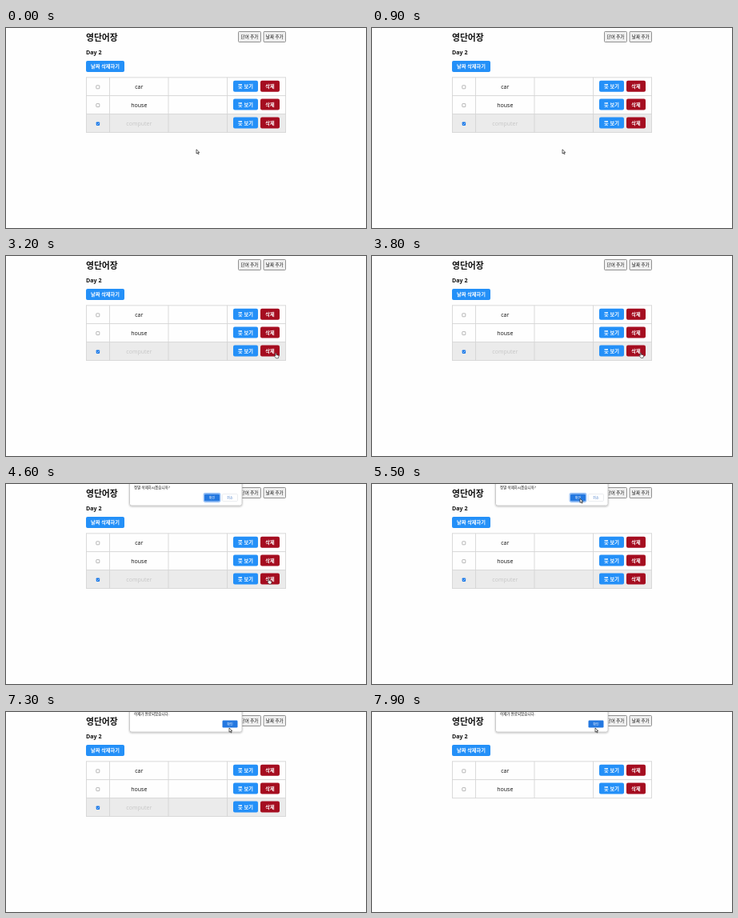
Write an HTML page that moves like this. It is 450 by 250 pixels and loops after 8 s.

```html
<!DOCTYPE html>
<html lang="ko">
<head>
<meta charset="utf-8">
<style>
html, body { margin: 0; width: 100%; height: 100%; overflow: hidden; background: #fefefe; }
svg { display: block; width: 450px; height: 250px; }
text { font-family: "Open Sans", "Noto Sans CJK KR", "Noto Sans CJK", sans-serif; fill: #111; }
.ko { font-family: "Noto Sans CJK KR", "Noto Sans CJK", sans-serif; }
.mid { text-anchor: middle; }
.bold { font-weight: 700; }
.white { fill: #fff; }
</style>
</head>
<body>
<svg id="stage" viewBox="0 0 450 250"></svg>
<script>
const BLUE = '#2490f8', RED = '#a50d20';
const rect = (x, y, w, h, fill, r = 0, extra = '') =>
  `<rect x="${x}" y="${y}" width="${w}" height="${h}" rx="${r}" fill="${fill}" ${extra}/>`;
const text = (x, y, size, str, cls = '', extra = '') =>
  `<text x="${x}" y="${y}" font-size="${size}" class="${cls}" ${extra}>${str}</text>`;
const button = (x, y, w, label, fill) =>
  rect(x, y, w, 14, fill, 2) + text(x + w / 2, y + 9.3, 6.2, label, 'ko mid bold white');
const topButton = (x, w, label) =>
  rect(x + .5, 4.5, w - 1, 13, '#efefef', 1, 'stroke="#777" stroke-width=".8"') +
  text(x + w / 2, 13, 5.5, label, 'ko mid');

function row(y, word, done) {
  const lines = [100.5, 129.5, 203, 276.5, 349.5].map(x => `M${x} ${y}v23`).join('');
  const box = done
    ? rect(112.7, y + 10, 4.4, 4.4, '#1375e8', .8) +
      `<path d="M113.6 ${y + 12.2}l1 1 1.7-2" fill="none" stroke="#fff" stroke-width=".7"/>`
    : rect(112.8, y + 10, 4, 4, '#fff', .6, 'stroke="#888" stroke-width=".6"');
  return rect(100.5, y, 249, 23, done ? '#ebebeb' : '#fefefe') +
    `<path d="${lines}M100 ${y}h250M100 ${y + 23}h250" fill="none" stroke="#d2d2d2" stroke-width=".8"/>` +
    box + text(166.3, y + 14.3, 7, word, 'mid', done ? 'style="fill:#c6c6c6"' : '') +
    button(284, y + 4, 31, '뜻 보기', BLUE) + button(318, y + 4, 24, '삭제', RED);
}

const panel = bottom =>
  rect(154.5, -6, 140.5, bottom + 6, '#fff', 2.5, 'stroke="#bbb" stroke-width=".7" filter="url(#shade)"');
const okButton = (x, y, id) =>
  rect(x - .3, y - .3, 20.6, 10.6, 'none', 1.8, `id="${id}" stroke="#8ab8f5" stroke-width="1.2"`) +
  rect(x + .5, y + .5, 19, 9, '#2478e0', 1.2) +
  text(x + 10, y + 6.5, 4, '확인', 'ko mid white');

stage.innerHTML = `
<defs><filter id="shade" x="-10%" y="-20%" width="120%" height="150%">
  <feDropShadow dx="0" dy=".8" stdDeviation="1" flood-color="#000" flood-opacity=".3"/></filter></defs>` +
  text(100, 15.8, 10.8, '영단어장', 'ko bold') +
  topButton(290, 29, '단어 추가') + topButton(321.5, 28.5, '날짜 추가') +
  text(100, 32.8, 7.1, 'Day 2', 'bold') +
  button(100, 41, 48, '날짜 삭제하기', BLUE) +
  `<g id="last">${row(107.5, 'computer', true)}</g>` +
  row(61.8, 'car') + row(84.6, 'house') +
  `<g id="ask">${panel(27)}${text(160, 5.8, 4.5, '정말 삭제하시겠습니까?', 'ko')}${okButton(247.5, 12, 'askRing')}` +
  rect(270.5, 12.5, 19, 9, '#fff', 1.2, 'stroke="#dde1e6" stroke-width=".6"') +
  text(280, 18.5, 4, '취소', 'ko mid', 'style="fill:#4a7fc8"') + `</g>
<g id="done">${panel(25)}${text(160, 3.6, 4.5, '삭제가 완료되었습니다.', 'ko')}${okButton(270, 10, 'doneRing')}</g>
<g id="cursor" stroke-linejoin="round">
  <path id="arrow" d="M0 0V5.2L1.3 4.1 2.2 6 3.1 5.6 2.2 3.7H3.8Z" fill="#fff" stroke="#222" stroke-width=".7"/>
  <path id="hand" d="M-.6 .4Q0-.4 .6 .4V2.3L3.2 2.9Q3.8 3.2 3.6 4.2L3 6.5H.3L-1.9 3.9Q-1.6 2.9-.6 3.7Z" fill="#fff" stroke="#222" stroke-width=".6"/>
</g>`;

// time, x, y
const path = [
  [0, 238, 151.8], [1500, 238, 151.8], [2400, 337.3, 121.3], [3700, 337.3, 121.3],
  [4100, 328.5, 118.5], [4750, 328.5, 118.5], [5300, 260, 18.2], [6700, 260, 18.2],
  [7200, 279, 20], [8000, 279, 20]
];
const el = id => document.getElementById(id);
const clamp = v => Math.max(0, Math.min(1, v));
const show = (id, on) => el(id).setAttribute('opacity', +on);

function draw(now) {
  const t = now % 8000;
  const i = path.findIndex(p => p[0] > t);
  const [a, b] = [path[i - 1], path[i]];
  const u = (t - a[0]) / (b[0] - a[0]), e = u * u * (3 - 2 * u);
  const x = a[1] + (b[1] - a[1]) * e, y = a[2] + (b[2] - a[2]) * e;
  el('cursor').setAttribute('transform', `translate(${x} ${y})`);
  const overButton = x > 318 && x < 342 && y > 111 && y < 126;
  show('hand', overButton);
  show('arrow', !overButton);
  show('ask', clamp((t - 4250) / 150) * clamp((5800 - t) / 150));
  show('done', clamp((t - 6290) / 200));
  show('doneRing', t < 7300);
  show('last', t < 7600);
  requestAnimationFrame(draw);
}
requestAnimationFrame(draw);
</script>
</body>
</html>
```
